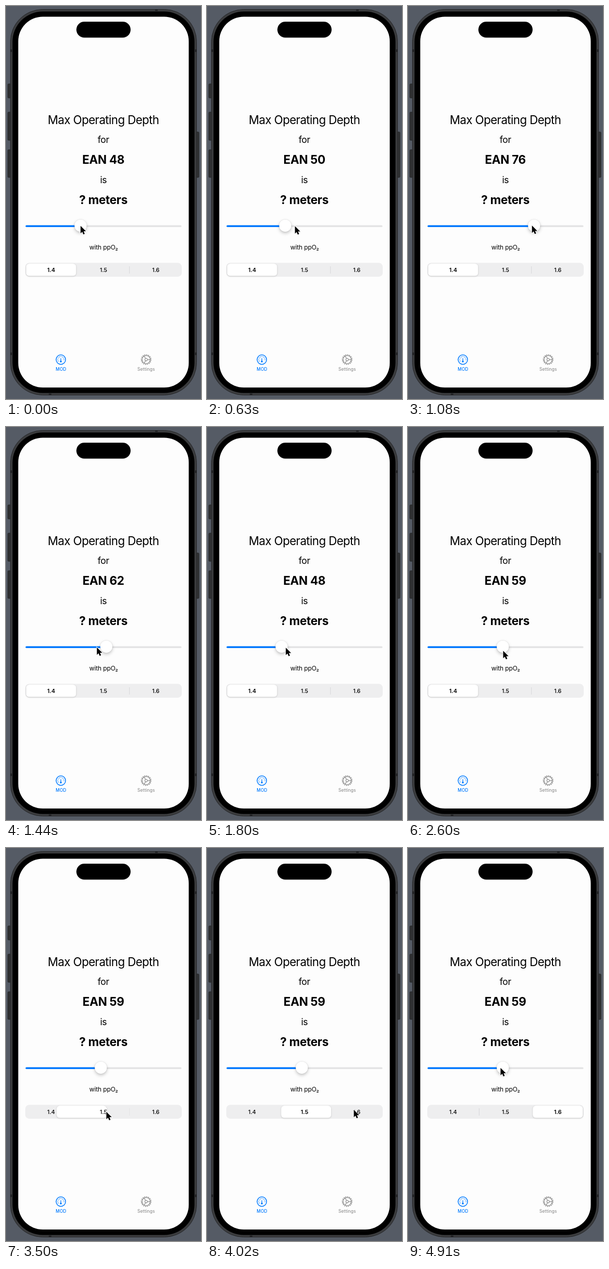
Recreate the animation shown at these times as an HTML page. Size 374 by 752 pixels, loop 4.93 s.

```html
<!DOCTYPE html>
<html lang="en">
<head>
<meta charset="utf-8">
<title>Max Operating Depth</title>
<style>
  html, body { margin: 0; width: 100%; height: 100%; overflow: hidden; background: #555b65; }
  svg { display: block; }
  text { font: 10.8px Inter, sans-serif; font-optical-sizing: none; text-anchor: middle; }
  .title { font-size: 22.3px; letter-spacing: -.6px; }
  .small { font-size: 17.6px; letter-spacing: -.5px; }
  .bold { font-size: 22.5px; font-weight: 700; letter-spacing: -.3px; }
  .note { font-size: 12px; letter-spacing: -.1px; }
  .tab { font-size: 8.3px; font-weight: 500; letter-spacing: .15px; }
  .knob { filter: drop-shadow(0 3px 3px #0003) drop-shadow(0 0 1px #0002); }
  .pill { filter: drop-shadow(0 1.5px 1.5px #0002) drop-shadow(0 0 .6px #0003); }
</style>
</head>
<body>
<svg width="374" height="752" viewBox="0 0 374 752">
  <!-- phone -->
  <g fill="#303133" stroke="#202123" stroke-width=".8">
    <rect x="3.5" y="149" width="6" height="27" rx="1.5"/>
    <rect x="3.5" y="203" width="6" height="54" rx="1.5"/>
    <rect x="3.5" y="275" width="6" height="53" rx="1.5"/>
    <rect x="364" y="241" width="6" height="87" rx="1.5"/>
  </g>
  <rect x="8.5" y="6.5" width="357" height="738" rx="62" fill="#3b3c3e" stroke="#252628"/>
  <path d="M286 8h5M82 743h5M10 83v5M364 83v5M10 663v5M364 663v5" stroke="#202123" stroke-width="3"/>
  <rect x="12.5" y="10.5" width="349" height="730" rx="58"/>
  <rect x="23.5" y="20.5" width="327" height="709.5" rx="47" fill="#fdfdfd"/>
  <rect x="135" y="30" width="104" height="30.5" rx="15.2"/>

  <text class="title" x="186.7" y="225.6">Max Operating Depth</text>
  <text class="small" x="186.7" y="262.3">for</text>
  <text class="bold" id="mix" x="186.7" y="302.3"></text>
  <text class="small" x="186.7" y="339">is</text>
  <text class="bold" x="186.7" y="379">? meters</text>
  <text class="note" x="187.2" y="465.5">with ppO₂</text>

  <!-- slider -->
  <rect x="37.5" y="419.6" width="299" height="3.4" rx="1.7" fill="#e4e4e5"/>
  <rect id="filled" x="37.5" y="419.6" height="3.4" rx="1.7" fill="#007aff"/>
  <circle id="knob" class="knob" cy="420.3" r="11.6" fill="#fff"/>

  <!-- segmented control -->
  <rect x="37" y="491.5" width="300" height="26.5" rx="7.3" fill="#eeeeef"/>
  <g fill="#d6d6d9">
    <rect class="divider" x="136" y="498" width="1" height="14"/>
    <rect class="divider" x="236.3" y="498" width="1" height="14"/>
  </g>
  <rect id="pill" class="pill" y="493" width="96" height="23.4" rx="5.8" fill="#fff"/>
  <text class="segment" x="86.5" y="508.7">1.4</text>
  <text class="segment" x="187" y="508.7">1.5</text>
  <text class="segment" x="287.3" y="508.7">1.6</text>

  <!-- tab bar -->
  <g transform="translate(105.2 676.6)" fill="none" stroke="#007aff" stroke-linecap="round">
    <circle r="9.1" stroke-width="1.5"/>
    <path d="M-5.2 2.8A5.9 5.9 0 1 1 5.2 2.8" stroke-width="1.6" stroke-dasharray="0 3.05"/>
    <path d="M0-2V3" stroke-width="1.3"/>
    <circle cy="3.7" r="1.7" fill="#007aff" stroke="none"/>
  </g>
  <text class="tab" x="105.4" y="698.3" fill="#007aff">MOD</text>
  <g transform="translate(268.8 676.6)" fill="none" stroke="#929292" stroke-width="1.3">
    <circle r="9.2" stroke-width="2" stroke-dasharray="1.8 1.812"/>
    <circle r="7.8"/>
    <circle r="2.4"/>
    <path d="M2.4 0H7.8M-1.2 2.1L-3.9 6.8M-1.2-2.1L-3.9-6.8"/>
  </g>
  <text class="tab" x="268.8" y="698.3" fill="#929292">Settings</text>

  <path id="cursor" d="M0 0V14.2L3.2 11.2L5.4 16.2L8 15.1L5.9 10.3H10.3Z" stroke="#fff" stroke-width="1.6" paint-order="stroke"/>
</svg>
<script>
const LOOP = 4930, FRAME = 90;
const SHORT_FRAMES = [1880, 3760, 3840, 4910]; // each of these begins 10 ms early

// Cursor moves: first frame, frame count, target x, target y
const MOVES = [
  [2, 1, 143, 421.6],
  [6, 6, 242, 420],
  [12, 8, 143, 422.5],
  [20, 5, 221, 420.5],
  [26, 3, 182.5, 428.3],
  [32, 4, 192.5, 504.8],
  [40, 4, 281.6, 501],
  [51, 5, 177.5, 420.8],
];
const LAST_DRAG = 28;

const $ = id => document.getElementById(id);
const segments = document.querySelectorAll('.segment');
const dividers = document.querySelectorAll('.divider');
const clamp = p => Math.min(1, Math.max(0, p));
const smooth = p => p * p * (3 - 2 * p);

function spring(frames) {
  const u = 2 * Math.max(0, frames);
  return 1 - (1 + u) * Math.exp(-u);
}

function cursorAt(frame) {
  let x = 143, y = 420.8;
  for (const [start, count, toX, toY] of MOVES) {
    const p = smooth(clamp((frame - start + 1) / count));
    x += (toX - x) * p;
    y += (toY - y) * p;
  }
  return { x, y };
}

function draw(t) {
  const frame = Math.floor((t + 10 * SHORT_FRAMES.filter(s => t >= s).length) / FRAME);
  const { x, y } = cursorAt(frame);
  $('cursor').setAttribute('transform', `translate(${x} ${y})`);

  // The knob trails the cursor by one frame and snaps to whole percents
  const dragX = cursorAt(Math.min(frame - 1, LAST_DRAG)).x;
  const percent = Math.round(48 + (dragX - 143) / 3.53);
  const knobX = 143 + (percent - 48) * 3.53;
  $('mix').textContent = `EAN ${percent}`;
  $('knob').setAttribute('cx', knobX);
  $('filled').setAttribute('width', knobX - 37.5);

  const toMiddle = spring(frame - 38.02), toRight = spring(frame - 44.86);
  const position = toMiddle + toRight;
  $('pill').setAttribute('x', 38.6 + 100.3 * position);
  dividers[0].style.opacity = toRight;
  dividers[1].style.opacity = 1 - toMiddle;
  segments.forEach((label, i) => {
    label.style.fontWeight = Math.abs(position - i) < .1 ? 600 : 450;
  });
}

function tick() {
  draw(performance.now() % LOOP);
  requestAnimationFrame(tick);
}
tick();
</script>
</body>
</html>
```
